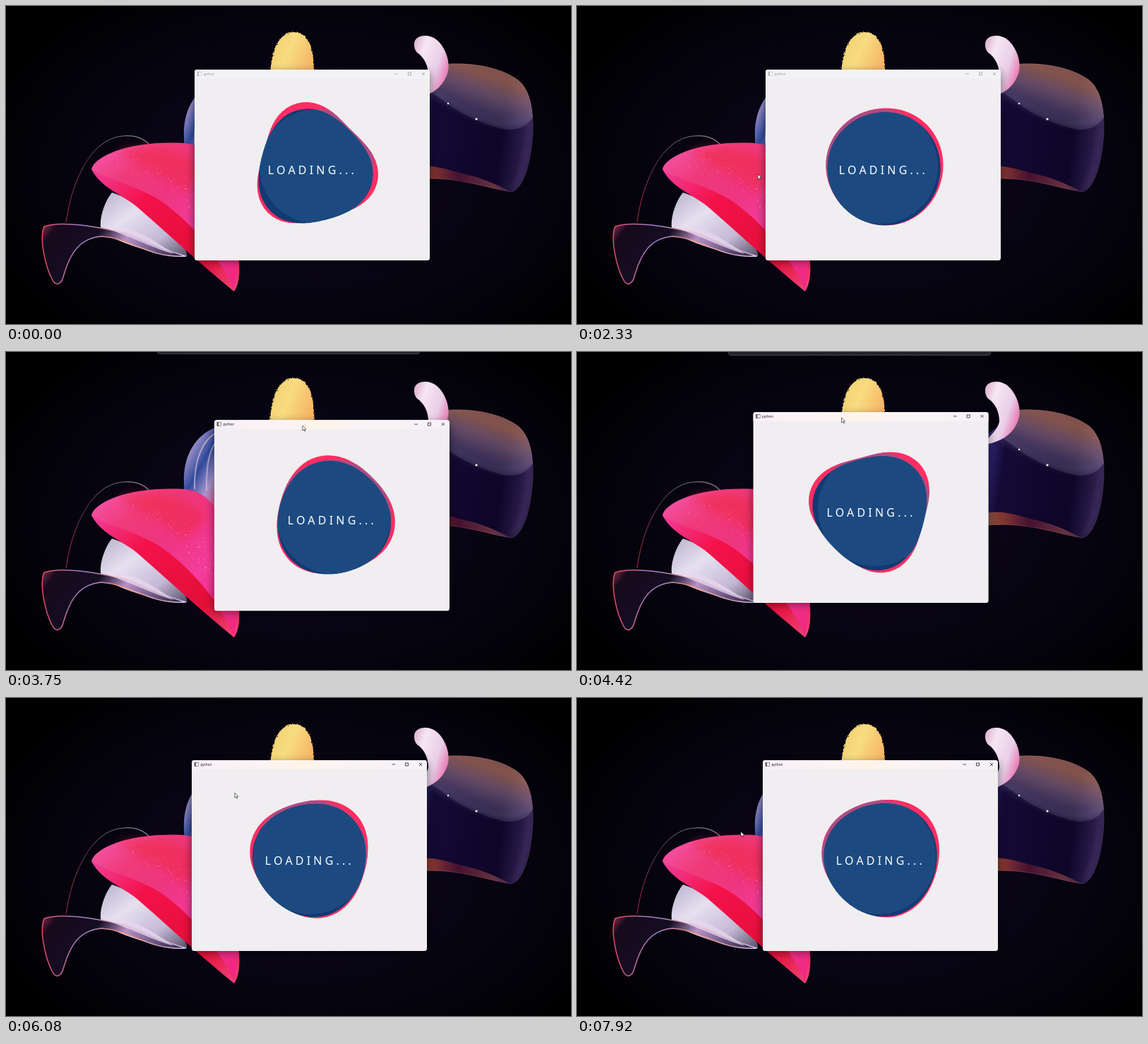
Animation of 800x450 px, one loop 8 s. Source, as an HTML page:

```html
<!DOCTYPE html>
<html lang="en">
<head>
<meta charset="utf-8">
<title>Loading blob</title>
<style>
  html, body { margin: 0; height: 100%; overflow: hidden; background: #000; }
  svg { display: block; width: 100vw; height: 100vh; }
  text { font-family: "Noto Sans", "Open Sans", sans-serif; }
</style>
</head>
<body>
<svg viewBox="0 0 800 450">
  <defs>
    <radialGradient id="night"><stop offset="0" stop-color="#100922"/><stop offset=".6" stop-color="#070411"/><stop offset="1" stop-color="#010103"/></radialGradient>
    <linearGradient id="yellow" x2="1" y2=".5"><stop stop-color="#f0cd68"/><stop offset=".5" stop-color="#f8dc82"/><stop offset="1" stop-color="#f6b465"/></linearGradient>
    <linearGradient id="petal" x2="1" y2=".6"><stop stop-color="#d9a9c8"/><stop offset=".3" stop-color="#f6e6f3"/><stop offset=".7" stop-color="#e9cfe8"/><stop offset="1" stop-color="#e873b0"/></linearGradient>
    <linearGradient id="crown" x1=".75" y1=".05" x2=".3" y2=".85"><stop stop-color="#e9997c"/><stop offset=".25" stop-color="#f7a36b"/><stop offset=".5" stop-color="#b68c9c"/><stop offset=".75" stop-color="#6c5e86"/><stop offset="1" stop-color="#262046"/></linearGradient>
    <linearGradient id="hat" x2="1" y2=".15"><stop stop-color="#3c3592"/><stop offset=".2" stop-color="#150a36"/><stop offset=".8" stop-color="#0e0527"/><stop offset="1" stop-color="#2b1e4c"/></linearGradient>
    <linearGradient id="rim"><stop stop-color="#ffa04a"/><stop offset=".2" stop-color="#f2602e"/><stop offset=".45" stop-color="#7c1c34"/><stop offset=".8" stop-color="#c0605a"/><stop offset="1" stop-color="#4a2a5c"/></linearGradient>
    <linearGradient id="glass" x2=".7" y2="1"><stop stop-color="#e8a8b0"/><stop offset=".25" stop-color="#9a8fc8"/><stop offset=".5" stop-color="#304a9c"/><stop offset=".75" stop-color="#a895cc"/><stop offset="1" stop-color="#e64d8b"/></linearGradient>
    <linearGradient id="magenta" x2=".8" y2="1"><stop stop-color="#f45bb5"/><stop offset=".25" stop-color="#ef3a78"/><stop offset=".45" stop-color="#ee3580"/><stop offset=".7" stop-color="#f43c9c"/><stop offset="1" stop-color="#f02a82"/></linearGradient>
    <linearGradient id="red" x2="1" y2="1"><stop stop-color="#f23f9c"/><stop offset=".3" stop-color="#f3124a"/><stop offset=".75" stop-color="#e30f38"/><stop offset="1" stop-color="#f0497d"/></linearGradient>
    <linearGradient id="pearl" x2="1" y2="1"><stop stop-color="#b8b2cc"/><stop offset=".35" stop-color="#e6e0f0"/><stop offset=".7" stop-color="#c4b9d6"/><stop offset="1" stop-color="#575069"/></linearGradient>
    <linearGradient id="curl" x2="1" y2=".3"><stop stop-color="#8a3050"/><stop offset=".1" stop-color="#170a1c"/><stop offset=".4" stop-color="#140d22"/><stop offset=".6" stop-color="#b792c8"/><stop offset="1" stop-color="#362b4f"/></linearGradient>
    <linearGradient id="edge"><stop stop-color="#e14c62"/><stop offset=".3" stop-color="#9b84ce"/><stop offset=".55" stop-color="#e8886e"/><stop offset="1" stop-color="#d3c4ec"/></linearGradient>
    <linearGradient id="arc" x1="0" y1="1" x2="1" y2="0"><stop stop-color="#96203e"/><stop offset=".5" stop-color="#45333f"/><stop offset="1" stop-color="#8f8a9a"/></linearGradient>
    <linearGradient id="mica"><stop stop-color="#f9f0f7"/><stop offset=".3" stop-color="#fbf3f4"/><stop offset=".45" stop-color="#fff4e8"/><stop offset=".6" stop-color="#fbf4f4"/><stop offset="1" stop-color="#f6f1f8"/></linearGradient>
    <filter id="rough"><feTurbulence baseFrequency=".4" numOctaves="2"/><feDisplacementMap in="SourceGraphic" scale="3" xChannelSelector="R" yChannelSelector="G"/></filter>
    <filter id="soft" x="-20%" y="-20%" width="140%" height="140%"><feGaussianBlur stdDeviation="6"/></filter>
    <filter id="glow" x="-50%" y="-50%" width="200%" height="200%"><feGaussianBlur stdDeviation="4"/></filter>
    <clipPath id="inPink"><use href="#pink"/></clipPath>
    <clipPath id="inNavy"><use href="#navy"/></clipPath>
    <clipPath id="inHat"><use href="#hatShape"/></clipPath>
  </defs>

  <ellipse cx="420" cy="240" rx="460" ry="300" fill="url(#night)"/>

  <!-- Wallpaper -->
  <path d="M371 112C374 80 378 37 406 36C431 37 436 62 436 112Z" fill="url(#yellow)" filter="url(#rough)"/>
  <path id="hatShape" d="M580 118L627 82C665 80 702 88 724 104C742 118 747 145 746 178C744 215 735 257 716 263C680 258 640 240 580 245Z" fill="url(#hat)"/>
  <g clip-path="url(#inHat)">
    <path d="M596 118L627 78H750V150C740 174 717 179 696 172C671 165 641 151 625 138C615 130 605 124 596 118Z" fill="url(#crown)"/>
    <path d="M600 122C621 130 647 151 690 164C715 171 736 164 750 147" fill="none" stroke="#a5a0bd" stroke-width="8" opacity=".4" filter="url(#glow)"/>
    <path d="M575 229C600 222 623 231 646 237C675 243 701 255 720 266L575 250Z" fill="url(#rim)"/>
    <path d="M742 160C742 204 732 239 718 260" fill="none" stroke="#8a70ac" stroke-width="5" opacity=".5" filter="url(#glow)"/>
  </g>
  <use href="#hatShape" style="fill:none" stroke="#9a6580" stroke-width=".5" opacity=".5"/>
  <path d="M578 55C577 41 598 38 610 48C622 58 629 78 626 92C621 112 606 126 578 131C580 120 596 112 598 98C598 84 592 74 585 68C580 65 578 60 578 55Z" fill="url(#petal)"/>
  <circle cx="666" cy="160" r="1.6" fill="#fff"/><circle cx="626" cy="138" r="1.2" fill="#fff"/>

  <path d="M304 105C270 112 250 148 252 184C252 210 257 226 272 238H304Z" fill="url(#glass)"/>
  <path d="M303 112C278 121 266 153 267 194M304 120C288 132 283 160 284 196" fill="none" stroke="#e7ccd8" stroke-width="2" opacity=".6"/>
  <path d="M85 306C93 250 119 188 165 184C188 182 201 191 207 202" fill="none" stroke="url(#arc)" stroke-width="1.2"/>
  <path d="M150 264C137 280 130 308 136 320C164 337 218 354 256 354C261 340 200 280 150 264Z" fill="url(#pearl)"/>
  <path d="M54 312C80 303 130 313 164 320C196 328 220 345 255 354C200 357 180 329 136 326C104 328 91 350 82 380C78 397 70 395 66 388C55 368 47 327 54 312Z" fill="url(#curl)" stroke="url(#edge)" stroke-width="1.5"/>
  <path d="M140 314C168 304 207 330 238 351C212 344 183 329 140 314Z" fill="#e9d8f1" opacity=".75"/>
  <path d="M121 231C135 258 163 266 184 283C217 311 260 352 323 404C333 390 331 362 328 340L240 255Z" fill="url(#red)"/>
  <path d="M121 231C126 211 178 190 252 194C296 197 322 245 330 350C328 372 326 385 323 402C302 355 270 314 224 279C188 254 147 248 121 231Z" fill="url(#magenta)"/>
  <path d="M158 205C210 194 252 202 285 232L255 266C224 240 190 225 158 205Z" fill="#f0294a" opacity=".55" filter="url(#soft)"/>
  <g id="sparkles" fill="#ffd9e8"></g>

  <rect id="snapBar" x="214.5" y="-12" width="371" height="16.5" rx="3" fill="#25212b" stroke="#49454f"/>

  <!-- Window -->
  <g id="window">
    <rect x="-2" y="3" width="337" height="270" rx="6" opacity=".4" filter="url(#soft)"/>
    <rect width="333" height="270" rx="3.5" fill="#f0eef0"/>
    <path id="titleBar" d="M0 13V3.500Q0 0 3.500 0H329.500Q333 0 333 3.500V13Z"/>
    <g id="titleInk">
      <rect x="4" y="3.500" width="5.500" height="5" fill="#fff" stroke="currentColor" stroke-width=".5"/>
      <path d="M4 3.500H6V8.500H4Z" fill="currentColor" opacity=".7"/>
      <text x="12.500" y="7.700" font-size="4.800" fill="currentColor">python</text>
      <path d="M283.500 6H288M302.500 4H306.500V8H302.500ZM322 4L326 8M326 4L322 8" fill="none" stroke="currentColor" stroke-width=".8"/>
    </g>
    <g transform="translate(166 135)">
      <path id="pink" fill="#ff2d63"/>
      <circle class="veil" cy="2" r="81" fill="#af4b82" clip-path="url(#inPink)"/>
      <path id="navy" fill="#0f3a72"/>
      <circle class="veil" cy="2" r="81" fill="#1c4a80" clip-path="url(#inNavy)"/>
    </g>
    <text x="103.800" y="148" font-size="16" letter-spacing="4.200" fill="#fff">LOADING...</text>
  </g>
  <path id="cursor" d="M0 0V7L1.700 5.500L2.900 8L4 7.500L2.900 5.100H5Z" fill="#fff" stroke="#111" stroke-width=".6"/>
</svg>
<script>
const $ = id => document.getElementById(id);
const LOOP = 8000, DRAG_START = 3420, DRAG_TIME = 2000;
const { PI, sin, cos, min, max } = Math;

const wave = (t, period) => cos(2 * PI * t / period);
const ramp = (t, from, to) => {
  const p = min(1, max(0, (t - from) / (to - from)));
  return p * p * (3 - 2 * p);
};
const mix = (a, b, p) => a.map((v, i) => v + (b[i] - v) * p);
const move = (id, [x, y]) => $(id).setAttribute("transform", `translate(${x} ${y})`);

// A circle with three lobes that swell and sink in place.
function blobPath(cx, cy, radius, lobe) {
  const steps = 72, tilt = PI / 12;
  const points = Array.from({ length: steps }, (_, i) => {
    const angle = i * 2 * PI / steps;
    const r = radius + lobe * cos(3 * (angle - tilt));
    return [cx + r * cos(angle), cy + r * sin(angle)];
  });
  return "M" + points.join("L") + "Z";
}

// The window is shaken sideways with fading swing, then dropped a little up and left.
function windowAt(t) {
  const u = min(DRAG_TIME, max(0, t - DRAG_START));
  const swing = sin(2 * PI * u / 1350) * (1 - u / DRAG_TIME) ** 1.5;
  const settle = ramp(u, 0, 1000);
  return [267 + 38 * swing - 4 * settle, 90 + 8.8 * swing - 2 * settle];
}

function cursorAt(t, [x, y]) {
  const rest = mix([205, 250], [256, 238], ramp(t, 2100, 2330));
  const grip = mix(rest, [x + 125, y + 8], ramp(t, 2580, 3330));
  return mix(grip, [232, 189], ramp(t, 5830, 6400));
}

function scatterSparkles() {
  let seed = 7;
  const random = () => (seed = seed * 16807 % 2147483647) / 2147483647;
  let dots = "";
  for (let i = 0; i < 130; i++) {
    const u = random(), x = 150 + 150 * u, y = 205 + 75 * u * u + random() * (28 + 22 * u);
    dots += `<circle cx="${x}" cy="${y}" r="${.3 + random() * .35}" opacity="${.25 + random() * .5}"/>`;
  }
  $("sparkles").innerHTML = dots;
}

function draw(now) {
  const t = now % LOOP;
  const swell = wave(t, 1777) * (.6 + .4 * wave(t, 4800));
  $("pink").setAttribute("d", blobPath(3, 2, 83, 9.5 * swell));
  $("navy").setAttribute("d", blobPath(2, 5, 80, 5.5 * swell));
  for (const veil of document.querySelectorAll(".veil"))
    veil.setAttribute("cx", 2 - 5 * wave(t - 2330, 5000));

  const active = t >= DRAG_START - 40;
  $("titleBar").setAttribute("fill", active ? "url(#mica)" : "#f3f2f4");
  $("titleInk").setAttribute("color", active ? "#222" : "#a09ea2");

  const corner = windowAt(t);
  move("window", corner);
  move("cursor", cursorAt(t, corner));
  $("cursor").setAttribute("visibility", t < 2100 ? "hidden" : "visible");
  move("snapBar", [0, -8 * (1 - ramp(t, 3420, 3900) + ramp(t, 5450, 5700))]);
  requestAnimationFrame(draw);
}

scatterSparkles();
draw(performance.now());
</script>
</body>
</html>
```
